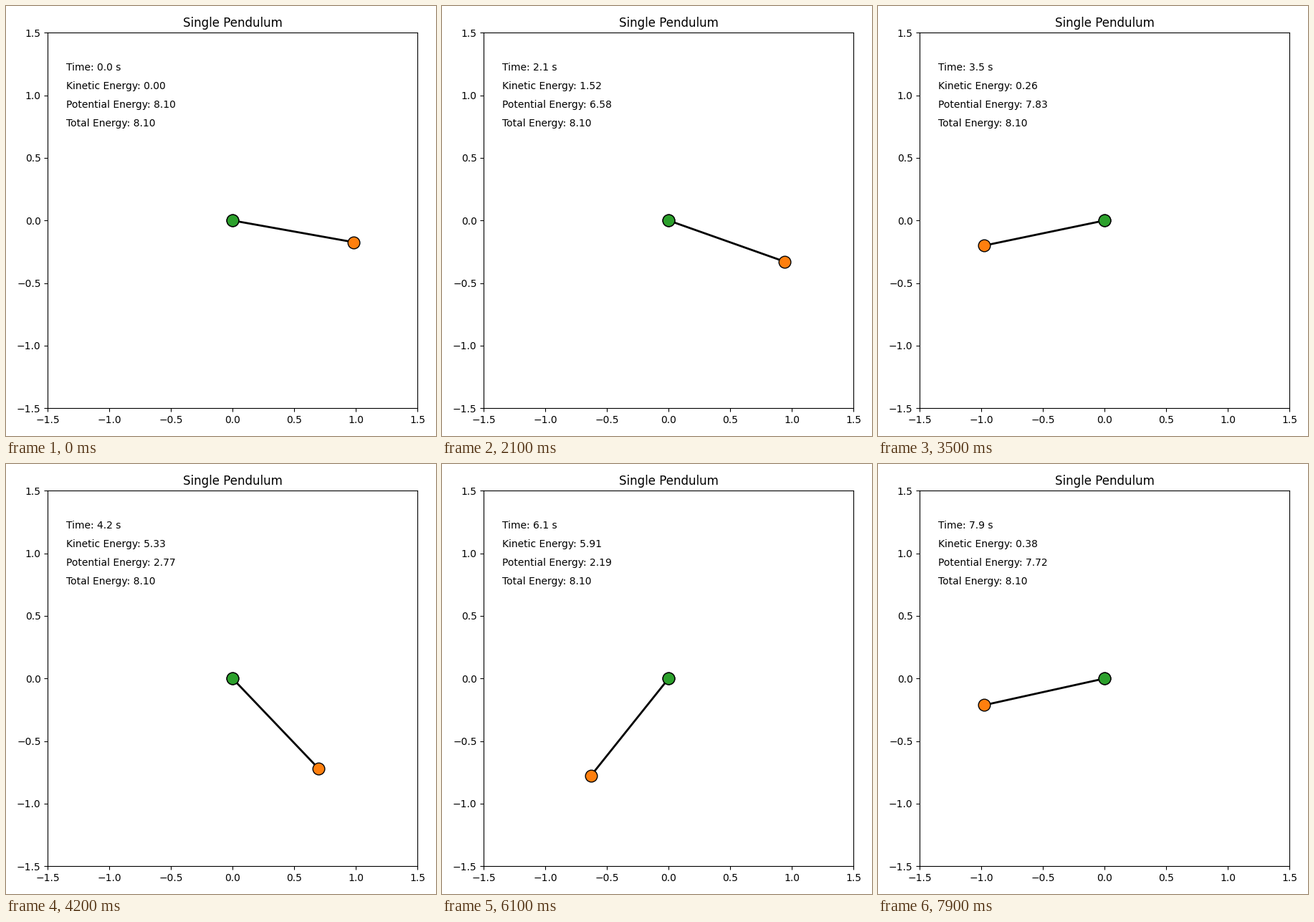
Recreate the animation shown at these times as a matplotlib script. Size 600 by 600 pixels, loop 8 s.

```python
import numpy as np
import matplotlib.pyplot as plt
from matplotlib.animation import FuncAnimation

G, LENGTH, MASS = 9.8, 1.0, 1.0
START = np.radians(80)
FRAMES, STEP_MS = 80, 100
SUBSTEPS = 50


def slope(state):
    theta, omega = state
    return np.array([omega, -G / LENGTH * np.sin(theta)])


def rk4(state, h):
    k1 = slope(state)
    k2 = slope(state + h / 2 * k1)
    k3 = slope(state + h / 2 * k2)
    k4 = slope(state + h * k3)
    return state + h / 6 * (k1 + 2 * k2 + 2 * k3 + k4)


def simulate():
    """Angle and angular velocity at every frame."""
    state = np.array([START, 0.0])
    states = [state]
    for _ in range(FRAMES - 1):
        for _ in range(SUBSTEPS):
            state = rk4(state, STEP_MS / 1000 / SUBSTEPS)
        states.append(state)
    return states


states = simulate()

plt.rcParams["font.family"] = "DejaVu Sans"
fig, ax = plt.subplots(figsize=(6, 6), dpi=100)
ax.set(xlim=(-1.5, 1.5), ylim=(-1.5, 1.5), title="Single Pendulum")
ticks = np.arange(-1.5, 1.6, 0.5)
ax.set_xticks(ticks)
ax.set_yticks(ticks)
fig.tight_layout()


def disc(color):
    return ax.plot([0], [0], "o", ms=12, color=color, markeredgecolor="black")[0]


rod, = ax.plot([], [], color="black", lw=2)
hub = disc("C0")
bob = disc("C1")
pivot = disc("C2")
labels = [ax.text(-1.35, y, "", fontsize=10) for y in (1.2, 1.05, 0.9, 0.75)]


def update(i):
    theta, omega = states[i]
    x, y = LENGTH * np.sin(theta), -LENGTH * np.cos(theta)
    rod.set_data([0, x], [0, y])
    bob.set_data([x], [y])

    kinetic = 0.5 * MASS * (LENGTH * omega) ** 2
    potential = MASS * G * (LENGTH + y)
    lines = (
        f"Time: {i * STEP_MS / 1000:.1f} s",
        f"Kinetic Energy: {kinetic:.2f}",
        f"Potential Energy: {potential:.2f}",
        f"Total Energy: {kinetic + potential:.2f}",
    )
    for label, line in zip(labels, lines):
        label.set_text(line)
    return [rod, hub, bob, pivot, *labels]


anim = FuncAnimation(fig, update, frames=FRAMES, interval=STEP_MS,
                     repeat=True, repeat_delay=0)
plt.show()
```
